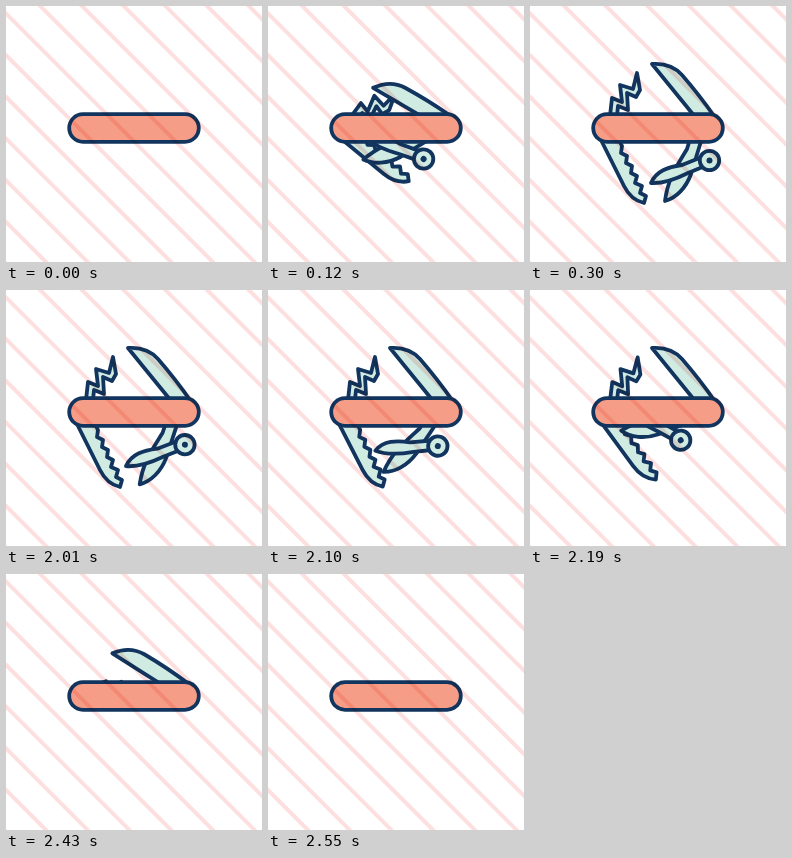
An HTML page that plays this animation: 256x256 px, repeating every 3.15 s.

```html
<!DOCTYPE html>
<html lang="en">
<head>
<meta charset="utf-8">
<title>Pocket knife</title>
<style>
  html, body { margin: 0; width: 100%; height: 100%; overflow: hidden; background: #fff; }
  svg { display: block; width: 100vw; height: 100vh; background: #fff; }
  .ink { stroke: #12355f; stroke-width: 3.8; stroke-linejoin: round; stroke-linecap: round; }
  .tool { fill: #d0ebe2; }
  .stripes { fill: url(#stripes); mix-blend-mode: multiply; }
</style>
</head>
<body>
<svg viewBox="0 0 256 256">
  <defs>
    <pattern id="stripes" width="29.5" height="29.5" patternUnits="userSpaceOnUse" patternTransform="translate(222 0) rotate(-45)">
      <rect x="12.75" width="4" height="29.5" fill="#fddfdf"/>
    </pattern>
    <clipPath id="above"><rect width="256" height="122"/></clipPath>
    <clipPath id="below"><rect y="122" width="256" height="134"/></clipPath>
  </defs>

  <g class="ink tool">
    <g clip-path="url(#above)">
      <path id="corkscrew" d="M80 110 L82 92 L92 96 L90 79 L103 83 L107 67 L110 84 L106 91 L97 87 L98 104 L88 100 L87 110 Z"/>
      <path id="knife" d="M166 112 L122 58 C134 57 144 60 152 69 C165 84 175 97 184 110 Z"/>
    </g>
    <g clip-path="url(#below)">
      <path id="saw" d="M68 128 L94 180 Q101 194 114 197 L116 190 L110 187 L112 180 L105 177 L107 170 L101 167 L102 160 L96 157 L97 150 L91 147 L92 140 L87 130 Z"/>
      <g id="scissors">
        <path d="M161 130 L157 143 C147 160 138 172 135 195 C146 192 156 182 161 168 L172 132 Z"/>
        <path d="M121 177 C126 165 138 161 152 159 L172 151 L175 160 L158 167 C146 173 134 178 121 177 Z"/>
        <circle cx="179.5" cy="154.5" r="9.7"/>
        <circle cx="179.5" cy="154.5" r="3" fill="#12355f" stroke="none"/>
      </g>
    </g>
  </g>

  <rect class="ink" x="63.2" y="108.2" width="129.6" height="27.6" rx="13.8" fill="#f59d86"/>
  <rect class="stripes" width="256" height="256"/>
</svg>
<script>
const LOOP = 3150, STEP = 30, SWING = 300;
const clamp = x => Math.max(0, Math.min(1, x));

// Pivot, folding angle and the moment each tool starts to fold away.
const tools = [
  { id: "scissors", x: 169.5, y: 122.5, fold: 105, start: 1980 },
  { id: "saw", x: 76, y: 123, fold: -60, start: 2070 },
  { id: "corkscrew", x: 78, y: 115, fold: 75, start: 2160 },
  { id: "knife", x: 180, y: 117, fold: -51, start: 2250 }
];

// 1 is folded, 0 is open.
function folded(t, start) {
  return t < SWING ? (1 - t / SWING) ** 1.8 : clamp((t - start) / SWING) ** 2;
}

function draw(now) {
  const t = Math.floor((now % LOOP) / STEP) * STEP;
  for (const { id, x, y, fold, start } of tools) {
    const amount = folded(t, start);
    const tool = document.getElementById(id);
    tool.setAttribute("transform", `rotate(${fold * amount} ${x} ${y})`);
    tool.setAttribute("visibility", amount < 1 ? "visible" : "hidden");
  }
}

const begin = performance.now();
function tick() {
  draw(performance.now() - begin);
  requestAnimationFrame(tick);
}
tick();
</script>
</body>
</html>
```
